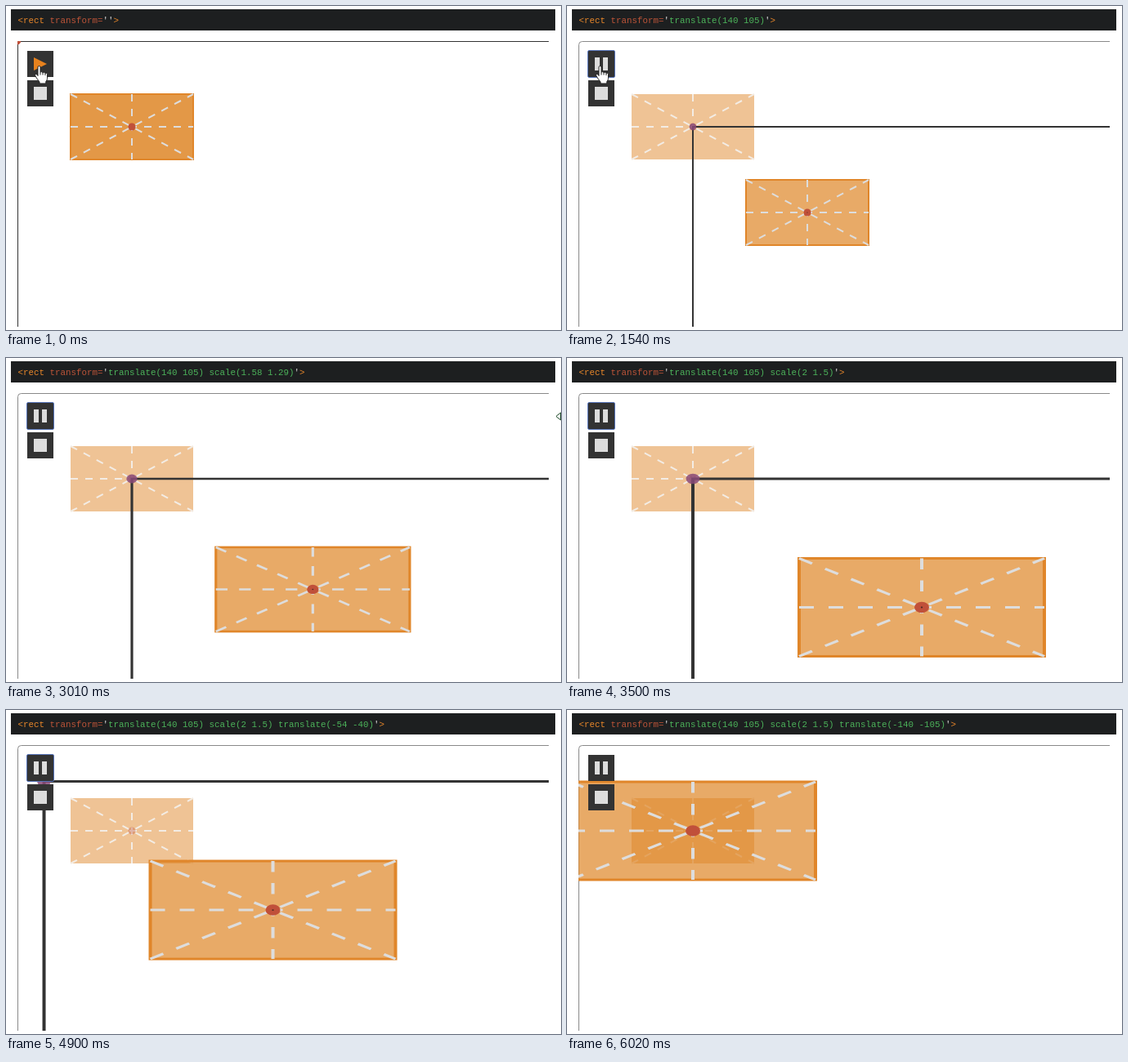
These frames come from a looping animation (679x397 px, 6.16 s). An HTML page:

```html
<!DOCTYPE html>
<html lang="en">
<head>
<meta charset="utf-8">
<title>Nested SVG transforms</title>
<style>
  html, body { margin: 0; width: 100%; height: 100%; overflow: hidden; background: #fff; }
  svg { display: block; }
  .code { font: 10.83px "Liberation Mono", monospace; white-space: pre; }
  .tag { fill: #e8872a; }
  .attr { fill: #bd5438; }
  .quote { fill: #ddd; }
  .value { fill: #4cb35a; }
  .dash { fill: none; stroke: #ddd; stroke-width: 2; stroke-dasharray: 9 9; }
</style>
</head>
<body>
<svg width="679" height="397" viewBox="0 0 679 397">
  <defs>
    <clipPath id="view"><rect x="14" y="43" width="650" height="350"/></clipPath>
    <path id="guides" d="M65 65L215 145M65 145L215 65M65 105H215M140 65V145"/>
  </defs>

  <rect x="6" y="4" width="666" height="26" fill="#1d1f20"/>
  <text class="code" x="14.5" y="21"><tspan class="tag">&lt;rect </tspan><tspan class="attr">transform=</tspan><tspan class="quote">'</tspan><tspan class="value" id="value"></tspan><tspan class="quote">'</tspan><tspan class="tag">&gt;</tspan></text>

  <path d="M14.5 393V47.5Q14.5 43.5 18.5 43.5H664" fill="none" stroke="#8a8a8a"/>

  <g clip-path="url(#view)">
    <g transform="translate(14 43)">
      <g id="ghost">
        <rect x="65" y="65" width="150" height="80" fill="#de8627" fill-opacity=".49"/>
        <use href="#guides" class="dash" style="stroke:#f3ece4"/>
        <circle cx="140" cy="105" r="4.5" fill="#c0503a" fill-opacity=".35"/>
      </g>
      <g id="moving">
        <path d="M0 700V0H700" fill="none" stroke="#333" stroke-width="2"/>
        <circle id="origin" r="4.2"/>
        <rect x="65" y="65" width="150" height="80" fill="#de8627" fill-opacity=".7" stroke="#e0862a" stroke-width="2"/>
        <use href="#guides" class="dash"/>
        <circle cx="140" cy="105" r="4.5" fill="#c0503a"/>
        <circle id="pin" cx="140" cy="105" r=".6" fill="#4a2a24"/>
      </g>
    </g>
  </g>

  <g fill="#333">
    <rect x="26" y="55" width="32" height="32"/>
    <rect x="26" y="91" width="32" height="32"/>
  </g>
  <rect id="ring" x="25.5" y="54.5" width="33" height="33" rx="1.5" fill="none" stroke="#5673b8"/>
  <path id="play" d="M34 63L50 71L34 79Z" fill="#e8821e"/>
  <path id="pause" d="M34 63h6v16h-6zM44 63h6v16h-6z" fill="#ddd"/>
  <rect x="34" y="99" width="16" height="16" fill="#ddd"/>

  <path id="hand" d="M0 1.5Q0 0 1.5 0T3 1.5V7.5Q4.5 6.5 6 8Q7.5 7 9 8.7Q11 8 11.5 10V15Q11.5 17.5 9.8 19V21.5H2V19.5Q-.5 16.5-3 12.5Q-4 10.5-2.6 10Q-1.3 9.6 0 12ZM3 7.5V11M6 8V11M9 8.7V11.5" fill="#fff" stroke="#222" stroke-linejoin="round"/>
  <path id="arrow" d="M673 71.5L678.5 67V76Z" fill="#fff" stroke="#1f4a2a"/>
</svg>

<script>
const LOOP = 6160, TICK = 70, MOVE = 1050;
const PRESS = 420, SCALE = 2450, BACK = 4550, BLUR = 6020;
const $ = id => document.getElementById(id);
const show = (id, on) => $(id).setAttribute("visibility", on ? "visible" : "hidden");
const progress = (t, start) => Math.min(1, Math.max(0, (t - start) / MOVE));
const round = (v, digits) => Number(v.toFixed(digits)) + 0;

// Builds the transform list; digits sets the precision of shifts and scales
function transforms(t, shiftDigits, scaleDigits) {
  const list = [];
  const add = (name, x, y, digits) =>
    list.push(`${name}(${round(x, digits)} ${round(y, digits)})`);
  if (t >= PRESS) {
    const p = progress(t, 455);
    add("translate", 140 * p, 105 * p, shiftDigits);
  }
  if (t >= SCALE) {
    const p = progress(t, 2400);
    add("scale", 1 + p, 1 + p / 2, scaleDigits);
  }
  if (t >= BACK) {
    const p = progress(t, 4497);
    add("translate", -140 * p, -105 * p, shiftDigits);
  }
  return list.join(" ");
}

function draw(time) {
  const t = Math.floor((time % LOOP) / TICK) * TICK;
  const started = t >= PRESS;

  $("value").textContent = transforms(t, 0, 2);
  $("moving").setAttribute("transform", transforms(t, 4, 4));
  $("origin").setAttribute("fill", started ? "#8a4a78" : "#c0503a");
  $("origin").setAttribute("fill-opacity", started ? 0.85 : 1);
  show("pin", started && t < 5600);

  show("play", !started);
  show("pause", started);
  show("ring", started && t < BLUR);

  // The pointer leaves over the top edge and passes the right one
  const leave = Math.max(0, (t - 2380) / 140);
  $("hand").setAttribute("transform", `translate(${39 + 10 * leave} ${73.5 - 97 * leave})`);
  show("hand", leave < 1);
  show("arrow", t >= 3010 && t < 3080);
}

const begin = performance.now();
function loop() {
  draw(performance.now() - begin);
  requestAnimationFrame(loop);
}
loop();
</script>
</body>
</html>
```
